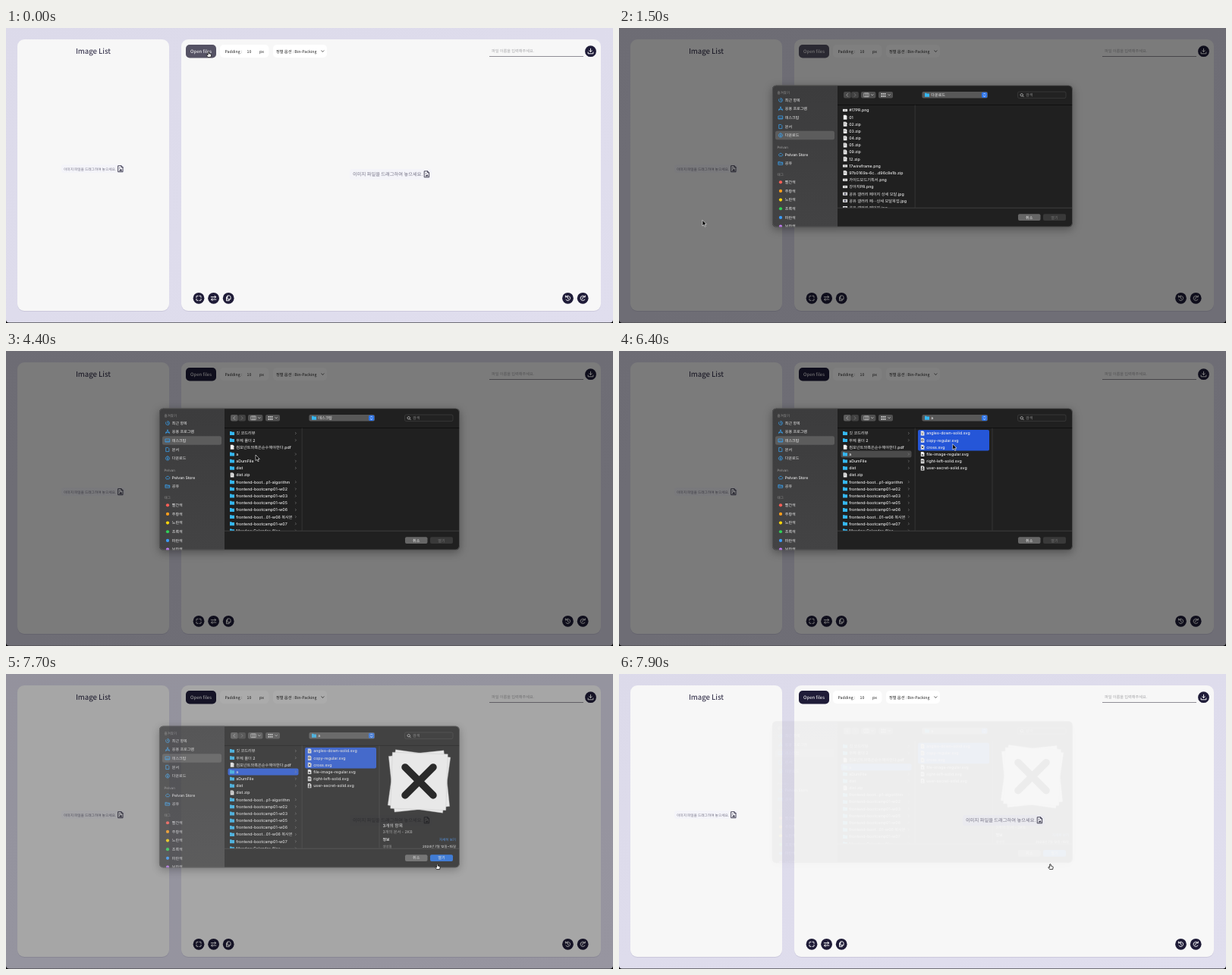
Recreate the animation shown at these times as an HTML page. Size 800 by 389 pixels, loop 8000 ms.

```html
<!DOCTYPE html>
<html>
<head>
<meta charset="utf-8">
<title>Image packing tool</title>
<style>
html, body { margin: 0; width: 100%; height: 100%; overflow: hidden; background: #000; }
svg { display: block; width: 100%; height: 100%; }
text { font-family: Inter, "Noto Sans CJK KR", "Noto Sans CJK JP", sans-serif; font-weight: 500; text-rendering: geometricPrecision; white-space: pre; }
.page text { font-family: "Noto Sans CJK KR", "Noto Sans CJK JP", "Noto Sans CJK SC", sans-serif; }
.line { fill: none; stroke-linecap: round; stroke-linejoin: round; }
#dialog { filter: drop-shadow(0 3px 6px rgba(0, 0, 0, .35)); }
</style>
</head>
<body>
<svg id="stage" viewBox="0 0 800 389"></svg>
<script>
const LENGTH = 8000;
const INK = '#1f1c38', BLUE = '#2556d8', SKY = '#3aa5f5';

const group = (id, body, attrs = '') => `<g id="${id}" ${attrs}>${body}</g>`;
const at = (x, y, body) => `<g transform="translate(${x} ${y})">${body}</g>`;
const rect = (x, y, w, h, fill, r = 0, attrs = '') =>
  `<rect x="${x}" y="${y}" width="${w}" height="${h}" rx="${r}" fill="${fill}" ${attrs}/>`;
const circle = (x, y, r, fill) => `<circle cx="${x}" cy="${y}" r="${r}" fill="${fill}"/>`;
const line = (d, color, width = .7) => `<path class="line" d="${d}" stroke="${color}" stroke-width="${width}"/>`;
const shape = (d, fill, attrs = '') => `<path d="${d}" fill="${fill}" ${attrs}/>`;
// y is the vertical middle of the capitals
const text = (x, y, words, size, fill, attrs = '') =>
  `<text x="${x}" y="${y + size * .36}" font-size="${size}" fill="${fill}" ${attrs}>${words}</text>`;
const MIDDLE = 'text-anchor="middle"', END = 'text-anchor="end"';

// ---- page ----
const imageIcon = (x, y, s) => `<g transform="translate(${x} ${y}) scale(${s})">` +
  line('M-3 -4H1L3 -2V4H-3ZM1 -4V-2H3', '#37354a', .9) +
  shape('M-2 2.7L-.7 .6L0 1.4L.8 .1L2.1 2.7Z', '#37354a') + circle(-1.2, -1, .6, '#37354a') + '</g>';
const roundButton = (x, y, d, flip = 1) => circle(x, y, 7.4, INK) +
  `<g transform="translate(${x} ${y}) scale(${flip} 1)">${line(d, '#fff', .95)}</g>`;

const TURN = 'M-2.6 -1.8A3.1 3.1 0 1 1 -2.6 1.8M-3.1 -3.4V-1.5H-1.1M0 -1.4V.2L1.1 1';
const DROP_HINT = '이미지 파일을 드래그하여 놓으세요.';

const page =
  rect(0, -10, 800, 398.4, 'url(#backdrop)', 4) +
  [[15, 200], [231, 553]].map(([x, w]) =>
    rect(x, 16, w, 358, 'rgba(60,50,100,.12)', 9) + rect(x, 15, w, 358, '#f7f7f7', 9)).join('') +
  text(115, 31, 'Image List', 9.7, INK, MIDDLE) +
  rect(73, 180, 84, 11, '#f4f4f9', 3) + text(76, 186, DROP_HINT, 4.7, '#777588') + imageIcon(151, 185.7, 1) +
  rect(453, 186, 108, 14, '#f4f4f9', 3) + text(457, 193, DROP_HINT, 6.25, '#777588') + imageIcon(554.6, 192.8, 1) +
  rect(237, 22, 40, 17.5, INK, 5, 'id="openButton"') + text(257, 31, 'Open files', 6, '#fff', MIDDLE) +
  rect(282, 22, 64.5, 17, '#fff', 5) + text(288.5, 31, 'Padding :', 5.25, '#222') +
  text(317.5, 31, '10', 5.25, '#222') + text(334, 31, 'px', 5.25, '#222') +
  rect(352, 22, 71, 17, '#fff', 5) + text(356, 31, '정렬 옵션 : Bin-Packing', 5.25, '#222') +
  line('M415.8 29.8L417.4 31.5L419 29.8', '#222') +
  text(640, 30.5, '파일 이름을 입력해주세요.', 5.2, '#a6a6a9') + rect(637, 37, 124, .8, '#77757f') +
  roundButton(770.5, 30.7, 'M0 -3.4V.6M-1.7 -1L0 .8L1.7 -1M-3.4 1.2V3.1H3.4V1.2') +
  roundButton(254, 356.3, 'M-3 -1V-2.6L-2.6 -3H-1M1 -3H2.6L3 -2.6V-1M3 1V2.6L2.6 3H1M-1 3H-2.6L-3 2.6V1') +
  roundButton(273.6, 356.3, 'M-3.3 -1.6H3M1.5 -3.1L3 -1.6L1.5 -.1M3.3 1.7H-3M-1.5 .2L-3 1.7L-1.5 3.2') +
  roundButton(293.2, 356.3, 'M-1 -3.4H1.5L2.8 -2.1V1.4H-1ZM-1 -1.6H-2.7V3.3H1V1.4') +
  roundButton(740.5, 356.3, TURN) + roundButton(760.2, 356.3, TURN, -1);

// ---- file dialog ----
const folder = shape('M-3 -2.5H-.8L-.1 -1.8H3V2.4H-3Z', '#35b7f1');
const sheet = shape('M-2.2 -3H1L2.4 -1.6V3H-2.2Z', '#f2f2f2');
const fileIcons = {
  folder, sheet,
  zip: sheet + line('M-.2 -2V1', '#777', .8),
  png: rect(-3, -1.6, 6, 3.2, '#eee') + rect(-2, -.4, 4, .8, '#888'),
  jpg: rect(-3, -2, 6, 4, '#eee') + rect(-1.6, -1.1, 3.2, 2.2, '#667'),
  down: sheet + line('M-1 -1L0 0L1 -1M-1 .7L0 1.7L1 .7', '#222', .6),
  copy: sheet + line('M-.9 -1H1V1H-.9Z', '#222', .6),
  cross: sheet + line('M-1.1 -1.1L1.1 1.1M1.1 -1.1L-1.1 1.1', '#111', .8),
  image: sheet + shape('M-1.6 1.8L-.2 -.4L1.6 1.8Z', '#222'),
  swap: sheet + line('M-1.3 -.7H1.2M1.3 .8H-1.2', '#222', .7),
  user: sheet + circle(0, -.8, 1, '#222') + rect(-1.5, .6, 3, 1.6, '#222', .8)
};
const rowY = i => 108.5 + i * 9.18;
const fileList = (x, rows) => rows.map(([kind, name], i) =>
  at(x + 3, rowY(i), fileIcons[kind]) + text(x + 8.2, rowY(i), name, 5.22, '#ededed') +
  (kind === 'folder' ? line(`M381.3 ${rowY(i) - 1.2}l1.2 1.2l-1.2 1.2`, '#888', .6) : '')).join('');

const zips = ['02', '03', '04', '05', '09', '12'].map(n => ['zip', n + '.zip']);
const downloads = [['png', '#17PR.png'], ['sheet', '01'], ...zips, ['png', '17wireframe.png'],
  ['zip', '97b0169a-6c...d96c8e1b.zip'], ['png', '가이드모드기획서.png'], ['png', '강아지PR.png'],
  ['jpg', '공유 갤러리 페이지 상세 모달.jpg'], ['jpg', '공유 갤러리 페···상세 모달목업.jpg'], ['jpg', '공유 갤러리 페이지.jpg']];
const desktop = [['folder', '깃 코드리뷰'], ['folder', '무제 폴더 2'], ['sheet', '컴포넌트와혹은순수해야한다.pdf'],
  ['folder', 'a'], ['folder', 'aDumFile'], ['folder', 'dist'], ['zip', 'dist.zip'],
  ...['boot...p1-algorithm', 'bootcamp01-w02', 'bootcamp01-w03', 'bootcamp01-w05', 'bootcamp01-w06',
    'boot...01-w06 복사본', 'bootcamp01-w07'].map(n => ['folder', 'frontend-' + n]), ['folder', 'Meadow Calendar_files']];
const icons = [['down', 'angles-down-solid'], ['copy', 'copy-regular'], ['cross', 'cross'], ['image', 'file-image-regular'],
  ['swap', 'right-left-solid'], ['user', 'user-secret-solid']].map(([kind, name]) => [kind, name + '.svg']);

const heading = (y, name) => text(208.5, y, name, 4.5, '#929292');
const place = (y, name, d) => at(213, y, line(d, SKY, .75)) + text(218.8, y, name, 5.05, '#ececec');
const tags = [['빨간색', '#ff5f57'], ['주황색', '#ff9f1c'], ['노란색', '#ffd60a'], ['초록색', '#30d158'], ['파란색', '#3b9cff'], ['보라색', '#c77dff']];

const sidebar = rect(202, 75.5, 86, 187, 'url(#side)') +
  rect(206, 0, 78, 11.4, '#5c5c5c', 2.5, 'id="sideMark"') +
  heading(85, '즐겨찾기') +
  place(95, '최근 항목', 'M0 -2.5A2.5 2.5 0 1 1 -2.2 -1.2M0 -1.3V.2H1.2') +
  place(106.5, '응용 프로그램', 'M-2.4 2.3L.3 -2.5M-.3 -2.5L2.4 2.3M-2.6 .8H2.6') +
  place(118, '데스크탑', 'M-2.7 -2H2.7V2H-2.7ZM-2.3 1H2.3') +
  place(130, '문서', 'M-1.9 -2.6H.6L1.9 -1.3V2.6H-1.9Z') +
  place(141.5, '다운로드', 'M0 -2.6A2.6 2.6 0 1 1 -.1 -2.6M0 -1.3V1.2M-1 .3L0 1.3L1 .3') +
  heading(157.5, 'Pelvan') +
  place(167, 'Pelvan Store', 'M-1.7 1.7A1.4 1.4 0 0 1 -1.5 -.9A1.9 1.9 0 0 1 1.8 -.8A1.3 1.3 0 0 1 1.8 1.7Z') +
  place(178.3, '공유', 'M-2.7 -1.9H-.7L0 -1.2H2.7V2H-2.7ZM-2.7 -.2H2.7') +
  heading(193.5, '태그') +
  tags.map(([name, color], i) => circle(213, 203.3 + i * 11.65, 2.1, color) +
    text(218.8, 203.3 + i * 11.65, name, 5.05, '#ececec')).join('');

const chevron = x => line(`M${x} 87.6l1.3 1.3l1.3 -1.3`, '#ddd', .7);
const toolbar =
  rect(296, 84, 9.7, 8.6, '#5a5a5a', 2, 'id="back"') + line('M301.6 86.5l-1.8 1.9l1.8 1.9', '#bbb') +
  rect(306.2, 84, 9.7, 8.6, '#414141', 2) + line('M310.2 86.5l1.8 1.9l-1.8 1.9', '#888') +
  rect(319, 84, 19.4, 8.6, '#505050', 2) + line('M323.2 86H329.2V90.7H323.2ZM325.2 86V90.7M327.2 86V90.7', '#ddd', .6) + chevron(332.5) +
  rect(342, 84, 19, 8.6, '#505050', 2) +
  [0, 1, 2].map(i => rect(345.5 + i * 2.2, 86, 1.5, 1.7, '#ddd') + rect(345.5 + i * 2.2, 89, 1.5, 1.7, '#ddd')).join('') + chevron(354.8) +
  rect(399.4, 84, 86.6, 8.6, '#585858', 2) + at(406, 88.3, folder) +
  `<text id="where" x="411.3" y="90.2" font-size="5.1" fill="#eee"></text>` +
  rect(478, 84.7, 7.2, 7.2, '#2a72e8', 1.6) + line('M480.4 87.3L481.6 86L482.8 87.3M480.4 89.3L481.6 90.6L482.8 89.3', '#fff') +
  rect(525.5, 84, 63.5, 8.6, '#222', 2, 'stroke="#434343" stroke-width=".6"') +
  line('M531.8 89.6A1.7 1.7 0 1 1 532 89.4L533.2 90.7', '#ddd') + text(536, 88.4, '검색', 5.1, '#858585');

const card = (angle, stroke) => rect(-36.5, -37, 73, 74, '#fff', 0, `transform="rotate(${angle})" stroke="${stroke}" stroke-width=".4"`);
const preview = at(544.5, 148.5, card(8, '#bbb') + card(-6, '#bbb') + card(2, '#ccc') +
    line('M-18.5 -18.5L18.5 18.5M18.5 -18.5L-18.5 18.5', '#000', 9.5)) +
  text(496.5, 206.5, '3개의 항목', 5.8, '#f2f2f2') + text(496.5, 215.2, '3개의 문서 - 2KB', 5.2, '#a5a5a5') +
  text(496.5, 225.3, '정보', 4.9, '#f2f2f2', 'style="font-weight:700"') + text(593, 225.3, '자세히 보기', 4.5, '#3f93ff', END) +
  text(496.5, 234.5, '생성일', 4.4, '#a5a5a5') + text(593, 234.5, '2024년 7월 12일~15일', 4.4, '#eee', END);

const divider = x => rect(x, 101.5, .8, 135.5, '#3a3a3a');
const dialog = group('dialog', `<g clip-path="url(#frame)">` +
  rect(202, 75.5, 396, 187, '#202020') + sidebar + toolbar +
  rect(288, 101, 310, .8, '#0c0c0c') + rect(288, 236.8, 310, .8, '#444') + divider(389.7) +
  `<g clip-path="url(#lists)">` +
  group('downloads', fileList(295, downloads)) +
  group('desktop', rect(292.5, 131.6, 93, 9, BLUE, 2, 'id="folderMark"') + fileList(295, desktop)) +
  group('icons', rect(394, 104, 94, 27.6, BLUE, 2, 'id="fileMark"') + fileList(397, icons)) +
  group('columnEdge', divider(491.6)) + group('preview', preview) + `</g>` +
  rect(526, 245.3, 29.5, 8.7, '#666', 2) + text(540.7, 249.7, '취소', 5.1, '#eee', MIDDLE) +
  rect(559, 245.3, 30, 8.7, '#393939', 2, 'id="confirm"') + text(574, 249.7, '열기', 5.1, '#777', MIDDLE + ' id="confirmText"') +
  `</g>` + rect(202.3, 75.8, 395.2, 186.3, 'none', 5.5, 'stroke="#616161" stroke-width=".7"'));

// ---- pointer, tip at the origin ----
const cursor = group('cursor',
  group('arrow', shape('M0 0V7.6L1.8 6L3 8.8L4.2 8.3L3 5.5H5.3Z', '#000', 'stroke="#fff" stroke-width=".6"')) +
  group('hand', shape('M-.7 .4Q0 -.5 .7 .4V2.5Q1.5 2.1 1.9 2.8Q2.8 2.5 3 3.3Q3.8 3.2 3.8 4.2L3.2 7H-.8L-2.7 4.4Q-2.4 3.4 -1.4 4L-.7 4.6Z',
    '#fff', 'stroke="#111" stroke-width=".8" stroke-linejoin="round"')));

document.getElementById('stage').innerHTML = `<defs>
  <linearGradient id="backdrop" x1="0" y1="0" x2="1" y2="1"><stop stop-color="#dcdaea"/><stop offset="1" stop-color="#e0deee"/></linearGradient>
  <linearGradient id="side" x1="0" y1="0" x2="0" y2="1"><stop stop-color="#3c3c3d"/><stop offset="1" stop-color="#434344"/></linearGradient>
  <clipPath id="frame">${rect(202, 75.5, 395.8, 187, '#000', 5.5)}</clipPath>
  <clipPath id="lists">${rect(288, 101.5, 309.8, 135.3, '#000')}</clipPath></defs>` +
  group('page', page, 'class="page"') + rect(0, 0, 800, 388.4, '#000', 0, 'id="dim"') + dialog + cursor;

// ---- motion ----
const el = id => document.getElementById(id);
const show = (id, on) => el(id).setAttribute('display', on ? 'inline' : 'none');
const fill = (id, color) => el(id).setAttribute('fill', color);

const pointerPath = [
  [100, 266.8, 31.4], [350, 291, 56], [600, 320, 84.5], [700, 320, 84.5],
  [800, 298, 62], [900, 245, 36], [1000, 188, 140], [1100, 145, 290], [1200, 122, 349], [1300, 115, 300],
  [1400, 115, 300], [1500, 109.8, 253.5], [1800, 165, 205], [2100, 232, 150], [2200, 232, 150],
  [2700, 229, 119], [3100, 228, 118], [3200, 245, 128], [3400, 346, 214], [3500, 346, 214],
  [4000, 338, 165], [4400, 329, 137], [4900, 329, 137], [5200, 365, 143], [5600, 446, 121], [5800, 439, 122],
  [6100, 439, 122], [6200, 439.5, 122.3], [6400, 439.5, 122.3], [6800, 530, 215], [7100, 572, 257],
  [7200, 572, 257], [7400, 568.4, 250.6]
];
// time, dimming, dialog opacity, dialog shift
const closing = [[7600, .5, 1, 0], [7700, .33, .75, -7], [7800, .12, .28, -11.3], [7900, 0, .04, -13.3], [7950, 0, 0, -14]];

function track(keys, t) {
  const next = keys.findIndex(k => k[0] > t);
  if (next < 0) return keys[keys.length - 1].slice(1);
  if (next === 0) return keys[0].slice(1);
  const a = keys[next - 1], b = keys[next], f = (t - a[0]) / (b[0] - a[0]);
  return a.slice(1).map((v, i) => v + (b[i + 1] - v) * f);
}

function draw(t) {
  const opened = t >= 1500, onDesktop = t >= 2900, inFolder = t >= 4500, picked = t >= 5900, ready = t >= 7300;
  const [dim, opacity, shift] = track(closing, t);
  const [x, y] = track(pointerPath, t);
  const hand = !opened || t >= 7500;

  const fade = Math.min(1, Math.max(0, (t - 1500) / 300));
  const [r, g, b] = [[85, 82, 100], [31, 28, 56]].reduce((from, to) => from.map((v, i) => v + (to[i] - v) * fade));
  fill('openButton', `rgb(${r},${g},${b})`);

  show('dim', opened);
  el('dim').setAttribute('opacity', dim);
  show('dialog', opened);
  el('dialog').setAttribute('opacity', opacity);
  el('dialog').setAttribute('transform', `translate(0 ${shift})`);

  el('sideMark').setAttribute('y', onDesktop ? 112.3 : 135.8);
  el('where').textContent = inFolder ? 'a' : onDesktop ? '데스크탑' : '다운로드';
  fill('back', onDesktop ? '#5a5a5a' : '#484848');
  show('downloads', t < 3200);
  show('desktop', t >= 3200);
  show('folderMark', inFolder);
  fill('folderMark', t >= 5700 && t < 6600 ? '#4b4b4b' : BLUE);
  show('icons', inFolder);
  show('fileMark', picked);
  show('columnEdge', t >= 6400);
  show('preview', t >= 6600);
  fill('confirm', ready ? '#1f6fe5' : '#393939');
  fill('confirmText', ready ? '#fff' : '#777');

  el('cursor').setAttribute('transform', `translate(${x} ${y})`);
  show('hand', hand);
  show('arrow', !hand);
}

const start = performance.now();
function tick() {
  draw((performance.now() - start) % LENGTH);
  requestAnimationFrame(tick);
}
tick();
</script>
</body>
</html>
```
